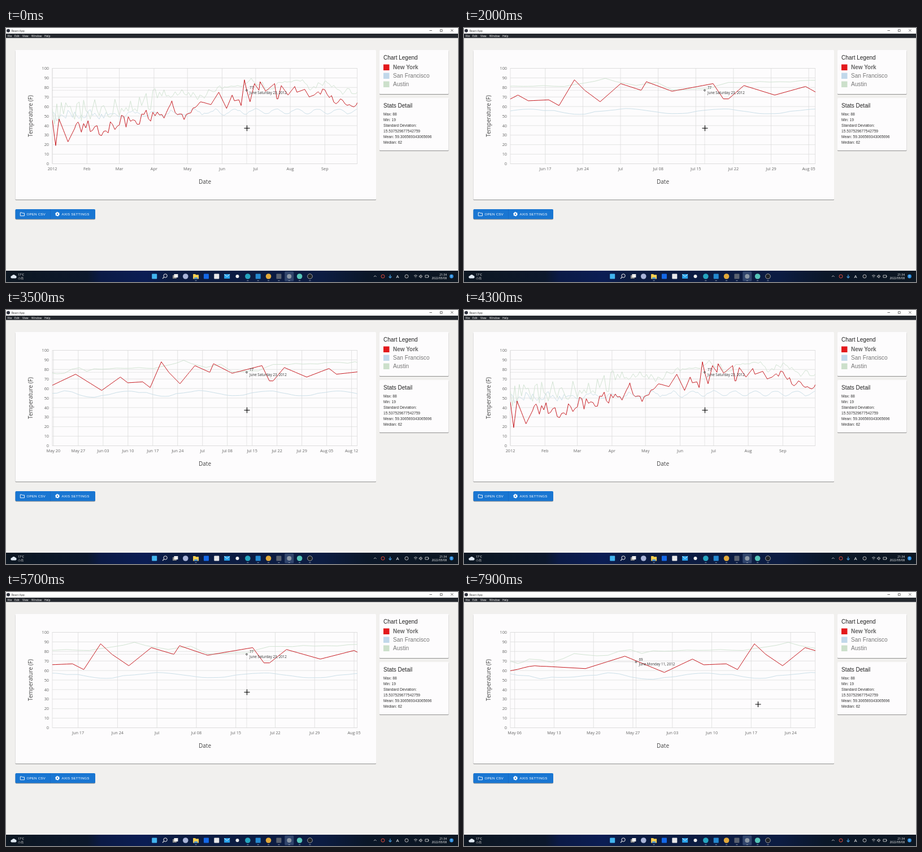
These frames come from a looping animation (800 by 450 pixels, 8000 ms). An HTML page:

```html
<!DOCTYPE html>
<html lang="en">
<head>
<meta charset="utf-8">
<title>React App</title>
<style>
html, body { margin: 0; width: 100%; height: 100%; overflow: hidden; background: #f1f0ee; }
svg { display: block; width: 800px; height: 450px; font-family: "Liberation Sans", Arial, sans-serif; }
.ui { font-family: "Open Sans", "Noto Sans", sans-serif; }
.card { fill: #fdfcfd; filter: drop-shadow(0 1px .7px #0006); }
.head { font-size: 10px; fill: #222; }
.key { font-size: 10.1px; fill: #777; }
.stat { font-size: 6.7px; fill: #333; }
.btn { font-size: 6.2px; letter-spacing: .18px; fill: #fff; }
.tick { font-size: 7.3px; fill: #666; }
.axis { font-size: 10px; fill: #444; text-anchor: middle; }
.tip { font-size: 6.2px; fill: #333; }
.bar { font-size: 5px; }
.mid { text-anchor: middle; }
.end { text-anchor: end; }
.grid { stroke: #dcdcdc; stroke-width: .8; fill: none; }
.line { fill: none; stroke-width: 1; stroke-linejoin: round; }
.guide { stroke: #bbb; stroke-width: .6; stroke-dasharray: 1.2 1; }
</style>
</head>
<body>
<svg viewBox="0 0 800 450">
  <defs>
    <clipPath id="plot"><rect x="82" y="67" width="540" height="174"/></clipPath>
    <linearGradient id="task">
      <stop offset="0" stop-color="#0d1722"/><stop offset=".18" stop-color="#0c182c"/>
      <stop offset=".21" stop-color="#0b1a46"/><stop offset=".31" stop-color="#0b1d54"/>
      <stop offset=".36" stop-color="#0c1c42"/><stop offset=".7" stop-color="#0c1c42"/>
      <stop offset=".8" stop-color="#0b1728"/><stop offset="1" stop-color="#0d1722"/>
    </linearGradient>
  </defs>

  <!-- window frame -->
  <rect width="800" height="450" fill="#f1f0ee"/>
  <rect width="800" height="10" fill="#fff"/>
  <rect y="10" width="800" height="7.7" fill="#24282e"/>
  <circle cx="4" cy="4.7" r="3" fill="#2b2e3a"/>
  <text class="ui bar" x="9.5" y="6.7" fill="#333">React App</text>
  <path d="M749.5 4.5h4.5M768.5 2.7h3.6v3.6h-3.6zM787.3 2.2l4.2 4.2m0-4.2l-4.2 4.2" fill="none" stroke="#333" stroke-width=".7"/>
  <g class="ui" font-size="4.9" fill="#fff">
    <text x="2.5" y="15.8">File</text><text x="15" y="15.8">Edit</text><text x="29" y="15.8">View</text>
    <text x="45" y="15.8">Window</text><text x="68" y="15.8">Help</text>
  </g>

  <!-- cards -->
  <rect class="card" x="16.5" y="39" width="638.5" height="265" rx="1.5"/>
  <rect class="card" x="661" y="39" width="122.5" height="78" rx="1.5"/>
  <rect class="card" x="661" y="124" width="122.5" height="93" rx="1.5"/>
  <text class="head" x="668" y="55.5">Chart Legend</text>
  <rect x="668" y="64.5" width="10.5" height="10.5" fill="#e3191c"/>
  <rect x="668" y="79.5" width="10.5" height="10.5" fill="#c1d8ea"/>
  <rect x="668" y="94.5" width="10.5" height="10.5" fill="#cce0cb"/>
  <text class="key" x="685" y="73.2" font-weight="bold" style="font-size:10px;fill:#666">New York</text>
  <text class="key" x="685" y="88.2">San Francisco</text>
  <text class="key" x="685" y="103.2">Austin</text>
  <text class="head" x="668" y="140.5">Stats Detail</text>
  <text class="stat" x="668" y="154.5">Max: 88</text>
  <text class="stat" x="668" y="164.5">Min: 19</text>
  <text class="stat" x="668" y="174.5">Standard Deviation:</text>
  <text class="stat" x="668" y="184.5">15.537529677542759</text>
  <text class="stat" x="668" y="194.5">Mean: 59.306569343065696</text>
  <text class="stat" x="668" y="204.5">Median: 62</text>

  <!-- buttons -->
  <rect class="card" x="16.5" y="321" width="141.5" height="17.5" rx="1.8" style="fill:#1976d2"/>
  <path d="M78.5 321v17.5" stroke="#1565c0" stroke-width=".6"/>
  <path d="M25.3 327h2.6l1 1h3.6v4.8h-7.2z" fill="none" stroke="#fff" stroke-width=".9"/>
  <circle cx="91" cy="329.7" r="2.2" fill="none" stroke="#fff" stroke-width="2"/>
  <circle cx="91" cy="329.7" r="3.5" fill="none" stroke="#fff" stroke-width="1" stroke-dasharray="1.8 1.865"/>
  <text class="btn" x="36.5" y="331.9">OPEN CSV</text>
  <text class="btn" x="98.5" y="331.9">AXIS SETTINGS</text>

  <!-- taskbar -->
  <rect y="430" width="800" height="20" fill="url(#task)"/>
  <path d="M10.5 443.5a2.2 2.2 0 0 1 0-4.4a3.3 3.3 0 0 1 6-.5a2.5 2.5 0 0 1 .3 4.9z" fill="#dfe8f2"/>
  <g class="ui bar" fill="#fff">
    <text x="21" y="438.7">17°C</text>
    <text x="21" y="445" fill="#bbb" style="font-family:'Noto Sans CJK SC','Noto Sans CJK JP',sans-serif">小雨</text>
    <text class="end" x="780" y="438.7">21:34</text>
    <text class="end" x="780" y="445">2022/05/08</text>
    <text class="mid" x="693" y="442.8" style="font-size:8px">A</text>
  </g>
  <g id="icons"></g>
  <path d="M651 441l2.3-2.3 2.3 2.3" fill="none" stroke="#ddd" stroke-width=".8"/>
  <circle cx="667" cy="440" r="3" fill="none" stroke="#e04a3c"/>
  <path d="M680 437v4m-2-1a2 2 0 0 0 4 0m-2 2v1.5" fill="none" stroke="#4aa3e8" stroke-width="1.1"/>
  <circle cx="709" cy="440" r="3" fill="none" stroke="#ddd" stroke-width=".8"/>
  <path d="M722 439a4.5 4.5 0 0 1 6 0M723.4 440.7a2.5 2.5 0 0 1 3.2 0M725 442.2v.6M731.5 439h1.2l1.8-1.6v5.4l-1.8-1.6h-1.2zM736 438.5a2.5 2.5 0 0 1 0 3M742 438h5.5v4h-5.5zM748.3 439.3v1.4" fill="none" stroke="#ddd" stroke-width=".8"/>
  <circle cx="788.5" cy="440" r="3.4" fill="#2f8fe0"/>
  <text class="ui mid" x="788.5" y="441.8" font-size="4.6" fill="#fff">1</text>

  <!-- chart -->
  <text class="ui axis" transform="translate(46.5 156) rotate(-90)">Temperature (F)</text>
  <text class="ui axis" x="352" y="276">Date</text>
  <g id="rows"></g>
  <g id="chart"></g>
</svg>
<script>
const $ = id => document.getElementById(id);
const LEFT = 82, WIDTH = 539.7, LAST = 273, BASE = WIDTH / LAST, ANCHOR = 403;
const LOOP = 8000, STEP = 100;

// Linear interpolation through [x, y] key points
function along(keys, x) {
  const i = keys.findIndex(([kx]) => x <= kx);
  if (i === 0) return keys[0][1];
  if (i < 0) return keys[keys.length - 1][1];
  const [x0, y0] = keys[i - 1], [x1, y1] = keys[i];
  return y0 + (x - x0) / (x1 - x0) * (y1 - y0);
}

// Seeded noise in -1..1 that turns every two days
function noise(seed, d) {
  const at = n => { const s = Math.sin(n * 12.9898 + seed) * 43758.5453; return 2 * (s - Math.floor(s)) - 1; };
  const n = Math.floor(d / 2), f = d / 2 - n;
  return at(n) * (1 - f) + at(n + 1) * f;
}

// Daily temperatures: a trend plus weather noise that calms down towards summer
const series = (seed, trend, swing) =>
  Array.from({ length: LAST + 1 }, (_, d) => trend(d) + along(swing, d) * noise(seed, d));

const newYork = series(1, d => along([
  [0, 46], [3, 19], [6, 47], [14, 23], [23, 44], [42, 38], [60, 41], [80, 50], [102, 51],
  [107, 69], [110, 55], [118, 48], [133, 65], [142, 62], [149, 75], [156, 58], [161, 72],
  [163, 66], [167, 67], [169, 61], [172, 88], [174, 77], [177, 65], [181, 84], [185, 77],
  [186, 86], [191, 76], [199, 84], [201, 68], [202, 68], [205, 82], [211, 72], [217, 81],
  [219, 75], [226, 78], [230, 70], [244, 77], [256, 64], [273, 63]
], d), [[20, 0], [25, 11], [75, 9], [100, 4], [125, 2], [135, 0], [232, 0], [245, 5]]);

const sanFrancisco = series(5,
  d => along([[0, 50], [110, 53], [170, 55]], d) + 2.5 * Math.cos((d - 200.5) / 18.5 * 2 * Math.PI),
  [[0, 4], [110, 2.5], [165, 1], [200, .5]]);

const austin = series(9, d => along([
  [0, 53], [60, 58], [90, 68], [117, 76], [131, 69], [150, 81], [170, 81], [178, 89], [184, 82],
  [188, 85], [191, 78], [198, 79], [202, 85], [224, 87], [231, 78], [245, 86], [255, 76], [273, 74]
], d), [[0, 12], [90, 11], [110, 4], [165, 3], [172, .5], [215, 1], [245, 4]]);

// Motion: zoom is log2 of the scale factor; drags are [from, to] times
const zoom = [[880, 0], [1400, 1.067], [2500, 3.267], [2750, 3.267], [3500, 1.668], [4250, 0], [4550, 0], [5650, 2.334]];
const cursorX = [[5800, 426.5], [6300, 290], [6450, 290], [6950, 527], [7100, 527], [7500, 304.5], [7685, 304.5], [7900, 520.5]];
const cursorY = [[5800, 177.5], [6300, 192], [6950, 196], [7500, 199]];
const drags = [[6450, 6950], [7685, 7900]];
const HOVER_START = 5800;

// The picture trails the pointer; the lines trail the axis by one more event
function viewAt(t, zoomLag = 0, panLag = 0) {
  const scale = BASE * 2 ** along(zoom, t - zoomLag);
  let pan = 0;
  for (const [from, to] of drags) {
    const time = Math.max(from, Math.min(t - panLag, to));
    pan += along(cursorX, time) - along(cursorX, from);
  }
  const start = ANCHOR / BASE - (ANCHOR + pan) / scale;
  return { start, scale, x: d => LEFT + (d - start) * scale };
}

const y = v => 240.5 - 1.69 * v;
const dateOf = d => new Date(Date.UTC(2012, 0, 1 + d));
const format = (date, options) => date.toLocaleDateString("en-US", { timeZone: "UTC", ...options });
const pad = n => String(n).padStart(2, "0");

function tickLabel(date) {
  const day = date.getUTCDate(), month = format(date, { month: "short" });
  if (day === 1) return date.getUTCMonth() ? month : date.getUTCFullYear();
  return (date.getUTCDay() ? format(date, { weekday: "short" }) : month) + " " + pad(day);
}

function isTick(date, spacing) {
  const day = date.getUTCDate();
  if (spacing > 14.5) return day === 1;
  if (spacing > 3.74) return date.getUTCDay() === 0;
  return day % 2 === 1;
}

function ticks(view) {
  const span = WIDTH / view.scale;
  let out = "";
  for (let d = Math.ceil(view.start - 1e-6); d <= view.start + span + 1e-6; d++) {
    const date = dateOf(d), x = view.x(d).toFixed(2);
    if (isTick(date, span / 10))
      out += `<path class="grid" d="M${x} 71.5V240.5"/><text class="ui tick mid" x="${x}" y="252.3">${tickLabel(date)}</text>`;
  }
  return out;
}

function line(data, view, colour) {
  const points = data.map((v, d) => `${view.x(d).toFixed(2)} ${y(v).toFixed(2)}`);
  return `<path class="line" stroke="${colour}" d="M${points.join("L")}"/>`;
}

function tooltip(t) {
  let x = 426, day = 174;
  if (t > HOVER_START) {
    const drag = drags.find(([from, to]) => t > from && t <= to);
    const seen = drag ? drag[0] : t, view = viewAt(seen);
    x = along(cursorX, seen);
    day = Math.round(view.start + (x - LEFT) / view.scale);
  }
  const value = Math.round(newYork[day]), cy = y(value), date = dateOf(day);
  const month = format(date, { month: "long" }), weekday = format(date, { weekday: "long" });
  return `<path class="guide" d="M${LEFT} ${cy}H${x}"/><path class="guide" d="M${x} ${cy}V240.5"/>
    <circle cx="${x}" cy="${cy}" r="1.4" fill="none" stroke="#222" stroke-width=".8"/>
    <text class="ui tip" x="${x + 5}" y="${cy - 2.2}">${value}</text>
    <text class="ui tip" x="${x + 5}" y="${cy + 6.4}">${month} ${weekday} ${pad(date.getUTCDate())}, 2012</text>`;
}

function draw(t) {
  const lines = viewAt(t, 33, 106);
  $("chart").innerHTML = ticks(viewAt(t, 0, 72)) +
    `<g clip-path="url(#plot)">${line(sanFrancisco, lines, "#cbdfe8")}${line(austin, lines, "#d2e4d3")}${line(newYork, lines, "#c6181e")}</g>` +
    tooltip(t) +
    `<path d="M${along(cursorX, t) - 5} ${along(cursorY, t)}h10m-5-5v10" stroke="#000" stroke-width="1.1"/>`;
}

let rows = `<rect class="grid" x="${LEFT}" y="71.5" width="${WIDTH}" height="169"/>`;
for (let v = 0; v <= 100; v += 10)
  rows += `<path class="grid" d="M${LEFT} ${y(v)}h${WIDTH}"/><text class="ui tick end" x="76" y="${y(v) + 2.6}">${v}</text>`;
$("rows").innerHTML = rows;

// Taskbar: plain marks, evenly spaced
const square = (x, c) => `<rect x="${x - 4.5}" y="435.5" width="9" height="9" rx="1" fill="${c}"/>`;
const disc = (x, c) => `<circle cx="${x}" cy="440" r="4.8" fill="${c}"/>`;
const marks = [
  [square, "#43b5f0"],
  [x => `<path d="M${x - 1.4} 441.4l-2.6 2.8" stroke="#eee" stroke-width="1.2"/><circle cx="${x + 1}" cy="439" r="3.2" fill="none" stroke="#eee"/>`],
  [x => `<rect x="${x - 4.5}" y="438" width="7" height="6" fill="#888"/><rect x="${x - 2}" y="436" width="7" height="6" fill="#eee"/>`],
  [disc, "#a9b4d8"],
  [x => `<path d="M${x - 5} 436h4l1 1.3h5v7.2h-10z" fill="#f8cf50"/><path d="M${x - 3} 442h6v2.5h-6z" fill="#3f8fd8"/>`],
  [square, "#1468e8"], [square, "#e8e8ea"],
  [x => `<rect x="${x - 5}" y="436" width="10" height="8" fill="#2aa2ea"/><path d="M${x - 5} 436.3l5 4 5-4" fill="none" stroke="#d8f0ff"/>`],
  [x => `<circle cx="${x}" cy="440" r="3" fill="#eee"/>`],
  [disc, "#25a5c0"], [square, "#2489d0"], [disc, "#e2a93a"], [square, "#5a6270"],
  [x => `<rect x="${x - 8}" y="431.5" width="16" height="17" rx="1.5" fill="#31456c"/><circle cx="${x}" cy="440" r="4" fill="#8b97a5"/>`],
  [disc, "#55c4b8"],
  [x => `<circle cx="${x}" cy="440" r="4.4" fill="#20242a" stroke="#ccc" stroke-width=".7"/>`]
];
$("icons").innerHTML = marks.map(([shape, colour], i) => {
  const x = 262.7 + i * 18.35;
  const running = i === 4 || i > 8 ? `<path d="M${x - 1.5} 447.6h3" stroke="#9aa5b5" stroke-width=".9"/>` : "";
  return shape(x, colour) + running;
}).join("");

let shown = -1;
function tick(now) {
  const t = Math.floor(now % LOOP / STEP) * STEP;
  if (t !== shown) draw(shown = t);
  requestAnimationFrame(tick);
}
tick(performance.now());
</script>
</body>
</html>
```
